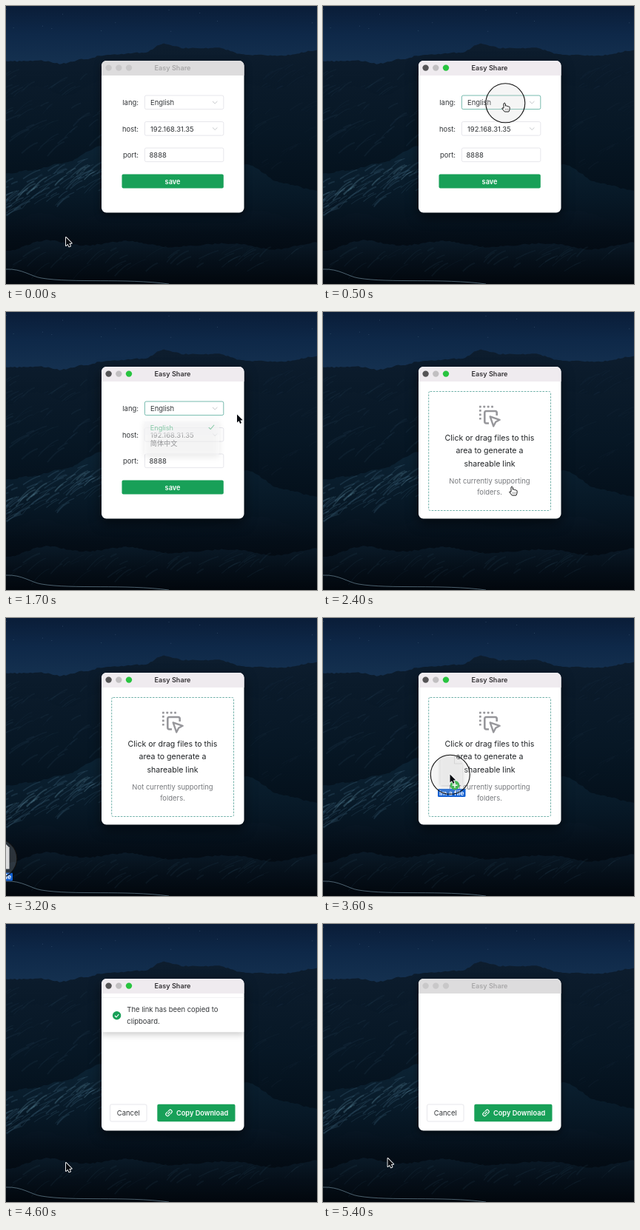
These frames come from a looping animation (420x376 px, 5.5 s). An HTML page with a canvas:

```html
<!DOCTYPE html>
<html lang="en">
<head>
<meta charset="utf-8">
<title>Easy Share</title>
<style>
html, body { margin: 0; width: 100%; height: 100%; overflow: hidden; background: #030a14; }
canvas { display: block; width: 420px; height: 376px; }
</style>
</head>
<body>
<canvas id="stage"></canvas>
<script>
const W = 420, H = 376, LOOP = 5500, STEP = 100;
const GREEN = '#18a058', LINE = '#e0e0e6', INK = '#333639';
const SANS = 'Inter, "Noto Sans CJK SC", "Noto Sans CJK", sans-serif';
const scale = window.devicePixelRatio || 1;
const stage = document.getElementById('stage');

function prepare(canvas) {
  canvas.width = W * scale;
  canvas.height = H * scale;
  const context = canvas.getContext('2d');
  context.scale(scale, scale);
  return context;
}
const ctx = prepare(stage);
const clamp = v => Math.max(0, Math.min(1, v));
const ease = v => v * v * (3 - 2 * v);

// ---- desktop picture ----
function makeRandom(seed) {
  return () => (seed = (seed * 16807) % 2147483647) / 2147483647;
}

function paintDesktop() {
  const canvas = document.createElement('canvas');
  const g = prepare(canvas);
  const random = makeRandom(77);

  const shade = (y0, y1, ...colors) => {
    const fill = g.createLinearGradient(0, y0, 0, y1);
    colors.forEach((c, i) => fill.addColorStop(i / (colors.length - 1), c));
    return fill;
  };
  const ridge = (points, fill, rough) => {
    g.beginPath();
    g.moveTo(0, H);
    for (let x = 0; x <= W; x += 3) {
      const i = points.findIndex(p => p[0] >= x);
      const b = points[i], a = points[Math.max(0, i - 1)];
      const part = b[0] === a[0] ? 0 : (x - a[0]) / (b[0] - a[0]);
      g.lineTo(x, a[1] + (b[1] - a[1]) * ease(part) + (random() - 0.5) * rough);
    }
    g.lineTo(W, H);
    g.fillStyle = fill;
    g.fill();
  };
  const streaks = (count, x, y, w, h, slope, color) => {
    g.strokeStyle = color;
    for (let i = 0; i < count; i++) {
      const sx = x + random() * w, sy = y + random() * h + (sx - x) * slope;
      const len = 8 + random() * 20;
      g.lineWidth = 0.6 + random() * 1.6;
      g.beginPath();
      g.moveTo(sx, sy);
      g.quadraticCurveTo(sx - len * 0.4, sy + len * 0.1, sx - len, sy + len * (0.4 + random() * 0.5));
      g.stroke();
    }
  };

  g.fillStyle = shade(0, 75, '#0a1d38', '#0e2848', '#14304f');
  g.fillRect(0, 0, W, H);
  g.fillStyle = 'rgba(150,180,210,.45)';
  for (let i = 0; i < 12; i++) g.fillRect(random() * W, random() * 34, 0.7, 0.7);

  ridge([[0, 75], [45, 74], [75, 78], [105, 72], [135, 66], [185, 63], [214, 51], [240, 57],
    [285, 57], [325, 66], [375, 67], [420, 60]], shade(55, 200, '#0d1d2e', '#081827', '#05111e'), 1.6);
  streaks(35, 0, 85, 140, 45, 0, 'rgba(35,62,82,.2)');
  streaks(25, 325, 78, 110, 60, 0, 'rgba(30,52,72,.18)');
  ridge([[0, 126], [40, 108], [80, 121], [130, 101], [220, 130], [320, 105], [365, 112], [420, 92]],
    shade(95, 250, '#0b1b2b', '#071725', '#04101b'), 2);
  streaks(35, 0, 125, 145, 60, 0, 'rgba(42,72,92,.18)');
  streaks(20, 330, 125, 100, 90, 0, 'rgba(30,52,70,.16)');
  ridge([[0, 227], [35, 222], [75, 213], [130, 190], [220, 230], [325, 215], [375, 240], [420, 250]],
    shade(190, 330, '#0c2334', '#071826', '#030b14'), 2);
  streaks(65, 0, 231, 145, 48, -0.24, 'rgba(58,96,120,.3)');
  streaks(20, 10, 240, 120, 18, -0.27, 'rgba(90,130,152,.26)');
  ridge([[0, 295], [45, 280], [95, 291], [150, 274], [250, 292], [340, 277], [420, 296]],
    shade(273, 345, '#081725', '#040e18', '#030910'), 2);
  ridge([[0, 331], [55, 317], [105, 324], [165, 318], [220, 326], [300, 321], [365, 329], [420, 320]],
    shade(316, H, '#0a1a28', '#050f19', '#02070d'), 2);
  streaks(45, 20, 323, 400, 26, 0, 'rgba(45,72,92,.16)');

  g.strokeStyle = 'rgba(125,155,172,.6)';
  g.lineWidth = 1;
  g.beginPath();
  g.moveTo(0, 356);
  g.bezierCurveTo(22, 355, 34, 366, 48, 368);
  g.bezierCurveTo(90, 375, 160, 368, 220, 376);
  g.stroke();
  return canvas;
}
const desktop = paintDesktop();

// ---- drawing helpers ----
function box(x, y, w, h, r, fill, stroke) {
  ctx.beginPath();
  ctx.roundRect(x, y, w, h, r);
  if (fill) { ctx.fillStyle = fill; ctx.fill(); }
  if (stroke) { ctx.strokeStyle = stroke; ctx.lineWidth = 0.8; ctx.stroke(); }
}

function disc(x, y, r, fill, stroke) {
  ctx.beginPath();
  ctx.arc(x, y, r, 0, 7);
  if (fill) { ctx.fillStyle = fill; ctx.fill(); }
  if (stroke) { ctx.strokeStyle = stroke; ctx.stroke(); }
}

function text(str, x, y, { size = 9.45, color = INK, align = 'left', weight = 400 } = {}) {
  ctx.font = `${weight} ${size}px ${SANS}`;
  ctx.textAlign = align;
  ctx.fillStyle = color;
  ctx.fillText(str, x, y);
}

function path(points, color, width, close) {
  ctx.beginPath();
  points.forEach(([x, y]) => ctx.lineTo(x, y));
  if (close) ctx.closePath();
  ctx.strokeStyle = color;
  ctx.lineWidth = width;
  ctx.stroke();
}

function shadow(color, blur, y) {
  ctx.shadowColor = color;
  ctx.shadowBlur = blur * scale;
  ctx.shadowOffsetY = y * scale;
}

// Runs a drawing in its own saved state.
function scoped(draw) {
  ctx.save();
  draw();
  ctx.restore();
}

// ---- window ----
function drawWindow(active) {
  scoped(() => {
    shadow('rgba(0,0,0,.55)', active ? 16 : 10, active ? 6 : 3);
    box(129, 74, 192.5, 205.5, 6.5, '#fff');
  });
  box(129, 74, 192.5, 20, [6.5, 6.5, 0, 0], active ? '#efebef' : '#dddcdd');
  const lights = active ? ['#555456', '#c1bfc1', '#28c440'] : ['#c9c8c9', '#c9c8c9', '#c9c8c9'];
  lights.forEach((c, i) => disc(138.6 + i * 13.7, 83.6, 4.2, c));
  text('Easy Share', 225, 87, {
    size: 9.1, weight: 600, align: 'center', color: active ? '#343235' : '#a9a8a9'
  });
}

function drawField(label, value, y, focus, isSelect = true) {
  text(label, 179, y + 13, { align: 'right' });
  box(187.4, y, 106.4, 18.6, 2, '#fff', focus ? '#55a99a' : LINE);
  text(value, isSelect ? 195 : 193.5, y + 13);
  if (isSelect) path([[279, y + 7.9], [282.2, y + 11], [285.4, y + 7.9]], '#bfc2c6', 0.9);
}

function drawSettings(t) {
  drawField('lang:', 'English', 121, t >= 500 && t < 2000);
  drawField('host:', '192.168.31.35', 156.5);
  drawField('port:', '8888', 192, false, false);
  box(156.5, 227.4, 137.3, 19, 2, t >= 2000 ? '#36ad6a' : GREEN);
  text('save', 225, 240.6, { size: 9.2, weight: 600, color: '#fff', align: 'center' });
  const opening = clamp((t - 800) / 230);
  const closing = clamp((t - 1600) / 200);
  const shown = opening * (1 - closing);
  if (shown > 0) drawMenu(shown);
}

function drawMenu(shown) {
  scoped(() => {
    const k = 0.94 + 0.06 * shown;
    ctx.globalAlpha = shown;
    ctx.translate(187, 145);
    ctx.scale(k, k);
    scoped(() => {
      shadow('rgba(0,0,0,.17)', 10, 3);
      box(0, 0.5, 104, 49, 2, '#fff');
    });
    box(0, 3, 104, 19, 0, '#f3f3f5');
    text('English', 8, 15, { color: GREEN });
    path([[89.5, 11.5], [92, 14], [97, 8]], GREEN, 1.1);
    text('简体中文', 8, 37.5);
  });
}

function drawUpload() {
  scoped(() => {
    ctx.setLineDash([2.6, 1.5]);
    box(142.7, 107.5, 164.8, 161, 2, '#fff', '#4f9f95');
  });
  const gray = '#97979b';
  for (let i = 0; i < 4; i++) {
    box(211 + i * 5.4, 126.7, 2.7, 2.7, 0.5, gray);
    if (i) box(211, 126.7 + i * 5.4, 2.7, 2.7, 0.5, gray);
  }
  scoped(() => {
    ctx.lineJoin = 'round';
    ctx.beginPath();
    ctx.moveTo(224, 150.5);
    ctx.lineTo(220.5, 150.5);
    ctx.quadraticCurveTo(218.3, 150.5, 218.3, 148);
    ctx.lineTo(218.3, 136.3);
    ctx.quadraticCurveTo(218.3, 134, 220.5, 134);
    ctx.lineTo(232.5, 134);
    ctx.quadraticCurveTo(234.7, 134, 234.7, 136.3);
    ctx.lineTo(234.7, 140);
    ctx.strokeStyle = gray;
    ctx.lineWidth = 2.6;
    ctx.stroke();
    path([[225.7, 141.4], [238.6, 145.8], [233.2, 148.8], [230.2, 154.4]], gray, 2.4, true);
  });
  const lines = ['Click or drag files to this', 'area to generate a', 'shareable link'];
  lines.forEach((s, i) => text(s, 225, 173.8 + i * 17.4, { size: 10.55, align: 'center', color: '#1f2225' }));
  text('Not currently supporting', 225, 231.5, { align: 'center', color: '#77797d' });
  text('folders.', 225, 246.7, { align: 'center', color: '#77797d' });
}

function drawLinkIcon(x, y) {
  scoped(() => {
    ctx.translate(x, y);
    ctx.rotate(-Math.PI / 4);
    ctx.strokeStyle = '#fff';
    ctx.lineWidth = 1.15;
    ctx.lineCap = 'round';
    for (const side of [-1, 1]) {
      ctx.beginPath();
      ctx.moveTo(side * 0.8, -2.3);
      ctx.lineTo(side * 2.6, -2.3);
      ctx.arc(side * 2.6, 0, 2.3, -Math.PI / 2, Math.PI / 2, side < 0);
      ctx.lineTo(side * 0.8, 2.3);
      ctx.stroke();
    }
    path([[-2, 0], [2, 0]], '#fff', 1.15);
  });
}

function drawResult(t) {
  box(140.5, 244, 49.5, 23, 2, '#fff', LINE);
  text('Cancel', 165.3, 258.9, { align: 'center' });
  box(204.3, 243.7, 105.2, 23.5, 2, t >= 4100 && t < 4400 ? '#36ad6a' : GREEN);
  drawLinkIcon(220, 255.5);
  text('Copy Download', 230, 258.9, { size: 9.2, weight: 600, color: '#fff' });
  const shown = ease(clamp((t - 4200) / 200)) * (1 - ease(clamp((t - 5000) / 200)));
  if (shown > 0) drawMessage(shown);
}

function drawMessage(shown) {
  scoped(() => {
    ctx.beginPath();
    ctx.rect(129, 94, 192.5, 180);
    ctx.clip();
    ctx.globalAlpha = shown;
    ctx.translate(0, (shown - 1) * 26);
    scoped(() => {
      shadow('rgba(0,0,0,.22)', 10, 3);
      box(129, 94, 192.5, 52.3, 1, '#fff');
    });
    path([[129, 99.5], [321.5, 99.5]], '#f0f0f1', 0.8);
    disc(149.6, 123.8, 5.7, GREEN);
    path([[147, 124], [149, 126], [152.3, 122.2]], '#fff', 1.1);
    text('The link has been copied to', 163.3, 119.4);
    text('clipboard.', 163.3, 134.6);
  });
}

// ---- pointer ----
const route = [
  [0, 81, 313], [500, 246, 131], [1200, 246, 131], [1500, 320, 140], [1700, 312, 138.5],
  [2100, 256, 236], [2500, 256, 236], [3000, -12, 330], [3200, -12, 325], [3600, 171.5, 211.5],
  [3800, 171.5, 211.5], [4200, 252, 252], [4300, 252, 252], [4600, 81, 323],
  [5000, 81, 323], [5400, 87.5, 317], [5500, 87.5, 317]
];
const clicks = [500, 900, 1600, 2100, 4200, 5000];

function pointerAt(t) {
  const i = route.findIndex(k => k[0] > t);
  const [t0, x0, y0] = route[i - 1], [t1, x1, y1] = route[i];
  const p = ease((t - t0) / (t1 - t0));
  return [x0 + (x1 - x0) * p, y0 + (y1 - y0) * p];
}

function drawArrow() {
  const outline = [[0, 0], [0, 11], [2.5, 8.7], [4.2, 12.4], [6, 11.6], [4.4, 8], [7.7, 7.8]];
  ctx.lineJoin = 'round';
  path(outline, '#fff', 1.8, true);
  ctx.fillStyle = '#080b10';
  ctx.fill();
}

function drawHand() {
  ctx.beginPath();
  ctx.moveTo(-2, 7);
  ctx.lineTo(-2, 1);
  ctx.quadraticCurveTo(-0.8, -1, 0.3, 1);
  ctx.lineTo(0.5, 4.2);
  ctx.quadraticCurveTo(1.8, 3.2, 2.8, 4.7);
  ctx.quadraticCurveTo(4, 3.9, 4.7, 5.2);
  ctx.quadraticCurveTo(6.1, 4.8, 6.2, 6.4);
  ctx.quadraticCurveTo(6.4, 9.4, 4.8, 12);
  ctx.lineTo(-0.7, 12);
  ctx.lineTo(-4.2, 7.8);
  ctx.quadraticCurveTo(-4.5, 6, -2, 7.4);
  ctx.fillStyle = '#fff';
  ctx.fill();
  ctx.strokeStyle = '#151515';
  ctx.lineWidth = 1;
  ctx.stroke();
  for (let i = 0; i < 3; i++) path([[0.2 + i * 1.8, 7.6], [0.2 + i * 1.8, 10]], '#555', 0.6);
}

function drawFile(overWindow) {
  scoped(() => {
    ctx.globalAlpha = 0.9;
    shadow('rgba(0,0,0,.25)', 4, 1);
    ctx.beginPath();
    [[-13, -25], [6, -25], [16.5, -14.5], [16.5, 14.5], [-13, 14.5]].forEach(p => ctx.lineTo(...p));
    ctx.fillStyle = '#f6f6f6';
    ctx.fill();
  });
  path([[6, -25], [6, -14.5], [16.5, -14.5]], '#cfcfcf', 0.8);
  box(-16.5, 19.5, 37.5, 11, 1.5, '#1260d2');
  text('im a file', 2.3, 28.3, { size: 9, weight: 600, color: '#fff', align: 'center' });
  if (overWindow) {
    disc(6.5, 14.7, 6.2, '#22b137');
    path([[3, 14.7], [10, 14.7]], '#fff', 1.6);
    path([[6.5, 11.2], [6.5, 18.2]], '#fff', 1.6);
  }
}

function drawPointer(t) {
  const [x, y] = pointerAt(t);
  const dragging = t >= 3200 && t < 3800;
  const overControl = (x > 187 && x < 294 && y > 120 && y < 140 && t < 1600)
    || (t >= 2000 && t < 2800 && x > 143 && x < 308 && y > 220)
    || (t >= 4100 && t < 4400);
  scoped(() => {
    ctx.translate(x, y);
    if (dragging) drawFile(x > 129);
    if (dragging || clicks.includes(t)) {
      ctx.lineWidth = 1.1;
      disc(0.3, 0.3, 26.5, 'rgba(205,205,205,.2)', '#111');
    }
    if (overControl) drawHand();
    else drawArrow();
  });
}

// ---- loop ----
function render(time) {
  const t = Math.floor((time % LOOP) / STEP) * STEP;
  ctx.drawImage(desktop, 0, 0, W, H);
  drawWindow(t >= 500 && t < 5100);
  if (t < 2200) drawSettings(t);
  else if (t < 3900) drawUpload();
  else drawResult(t);
  drawPointer(t);
}

const start = performance.now();
function tick() {
  render(performance.now() - start);
  requestAnimationFrame(tick);
}
tick();
</script>
</body>
</html>
```
